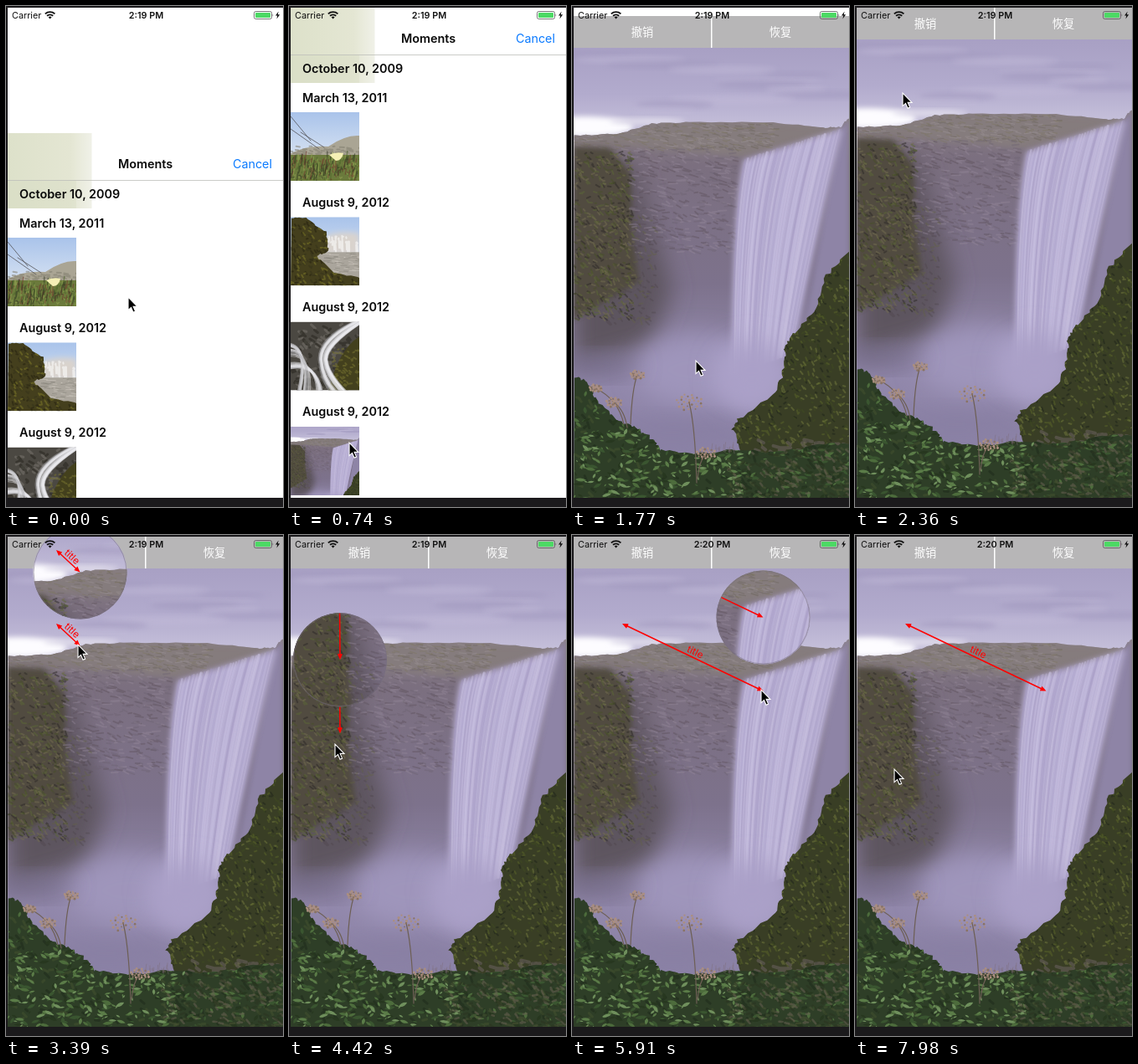
Animation of 331 by 599 pixels, one loop 8 s. Source, as an HTML page:

```html
<!DOCTYPE html>
<html lang="en">
<head>
<meta charset="utf-8">
<title>Photo annotation demo</title>
<style>
html, body { margin: 0; width: 100%; height: 100%; overflow: hidden; background: #1b1a1c; }
svg { display: block; width: 331px; height: 599px; font-family: Inter, "Liberation Sans", sans-serif; }
.head { font-size: 14.4px; font-weight: 600; fill: #0a0a0a; }
.mid { text-anchor: middle; }
.tool { font: 13.2px "Noto Sans CJK SC", "Noto Sans CJK", sans-serif; fill: #fff; text-anchor: middle; }
</style>
</head>
<body>
<svg viewBox="0 0 331 599">
  <defs>
    <clipPath id="screen"><rect x="2" y="2" width="329" height="586"/></clipPath>
    <clipPath id="frame"><rect x="2" y="40" width="329" height="548"/></clipPath>
    <clipPath id="square"><rect width="82" height="82"/></clipPath>
    <clipPath id="lens"><circle id="lensCut" r="56"/></clipPath>
    <filter id="soft" x="-30%" y="-30%" width="160%" height="160%"><feGaussianBlur stdDeviation="3"/></filter>
    <filter id="haze" x="-50%" y="-50%" width="200%" height="200%"><feGaussianBlur stdDeviation="14"/></filter>
    <linearGradient id="sky" x2="0" y2="1">
      <stop stop-color="#a8a0c4"/><stop offset=".5" stop-color="#b2abcd"/><stop offset="1" stop-color="#cbc6de"/>
    </linearGradient>
    <linearGradient id="rock" x2="0" y2="1">
      <stop stop-color="#8b8284"/><stop offset=".15" stop-color="#7b6f7f"/>
      <stop offset=".5" stop-color="#7d728c"/><stop offset=".75" stop-color="#9389ac"/><stop offset="1" stop-color="#8b82a6"/>
    </linearGradient>
    <linearGradient id="tint">
      <stop stop-color="#dde1ca"/><stop offset=".75" stop-color="#e4e6d3"/><stop offset="1" stop-color="#f0f1e8"/>
    </linearGradient>
    <linearGradient id="blue" x2="0" y2="1"><stop stop-color="#a9c3ea"/><stop offset="1" stop-color="#eef2f6"/></linearGradient>
  </defs>
  <rect width="331" height="599" fill="#1b1a1c"/>
  <g clip-path="url(#screen)">
    <rect width="331" height="599" fill="#fff"/>
    <g id="picker"></g>
    <g id="editor">
      <rect x="2" y="2" width="329" height="38" fill="#b7b6b7"/>
      <rect x="166" y="2" width="1.5" height="38" fill="#fff"/>
      <text class="tool" x="84" y="26">撤销</text>
      <text class="tool" x="249" y="26">恢复</text>
      <g id="photo" clip-path="url(#frame)"></g>
    </g>
    <g id="arrow" fill="#f00">
      <path id="shaft" stroke="#f00" stroke-width="1.5"/>
      <path id="tips"/>
      <text id="label" class="mid" font-size="11.6">title</text>
    </g>
    <g id="loupe">
      <g clip-path="url(#lens)"><use href="#photo" y="-88"/><use href="#arrow" y="-88"/></g>
      <circle id="ring" r="55.5" fill="none" stroke="#77707f" stroke-opacity=".55"/>
    </g>
    <g id="status" fill="#111">
      <text x="7" y="15" font-size="10.8">Carrier</text>
      <path d="M46.8 9.4A8.6 8.6 0 0 1 58.4 9.4M49 11.8A5.4 5.4 0 0 1 56.2 11.8" fill="none" stroke="#111" stroke-width="1.9"/>
      <path d="M50.6 13.3A3 3 0 0 1 54.6 13.3L52.6 15.6Z"/>
      <text id="clock" class="mid" x="167.5" y="15" font-size="10.8" font-weight="600"></text>
      <rect x="296.5" y="6.5" width="21" height="9" rx="2" fill="none" stroke="#555" stroke-width=".8"/>
      <rect x="298" y="8" width="18" height="6" rx="1" fill="#4cd964"/>
      <path d="M318.6 9.4q1.6 1.6 0 3.2Z" fill="#555"/>
      <path d="M325.6 6.6L322 11.6H324.3L323.4 15.4L327.2 10.2H324.8Z"/>
    </g>
  </g>
  <path id="cursor" d="M0 0V15.6L3.5 12.4L6 18.2L8.6 17.1L6.1 11.4H11Z" fill="#000" stroke="#fff" stroke-width="1.1"/>
</svg>
<script>
const $ = id => document.getElementById(id);
let seed = 7;
const rnd = () => (seed = (seed * 16807) % 2147483647) / 2147483647;
const spread = (a, size) => +(a + rnd() * size).toFixed(1);
const many = (n, make) => Array.from({ length: n }, (_, i) => make(i, i / n)).join('');
const mix = (a, b, k) => a + (b - a) * k;
const shape = (d, fill, filter) => `<path d="${d}" fill="${fill}" ${filter ? `filter="url(#${filter})"` : ''}/>`;
const line = (d, color, width, opacity = 1) =>
  `<path d="${d}" fill="none" stroke="${color}" stroke-width="${width}" stroke-linecap="round" opacity="${opacity}"/>`;
const oval = (x, y, rx, ry, fill, filter = 'haze') =>
  `<ellipse cx="${x}" cy="${y}" rx="${rx}" ry="${ry}" fill="${fill}" filter="url(#${filter})"/>`;
const box = (fill, x = 0, y = 0, w = 82, h = 82, opacity = 1) =>
  `<rect x="${x}" y="${y}" width="${w}" height="${h}" fill="${fill}" opacity="${opacity}"/>`;
const clipped = (id, d, inner) =>
  `<clipPath id="${id}"><path d="${d}"/></clipPath><g clip-path="url(#${id})">${inner}</g>`;

// Outline through a few points "x,y x,y", broken up by random offsets
function ridge(points, rough) {
  const p = points.split(' ').map(s => s.split(',').map(Number));
  return 'M' + p.slice(1).map(([x, y], i) => many(8, (_, k) =>
    `${spread(mix(p[i][0], x, k), rough)} ${spread(mix(p[i][1], y, k), rough)} `)).join('') + p.at(-1);
}

// Random short strokes inside a box, one layer for each colour
const texture = (colors, n, [x, y, w, h], dx, dy, width = 2, opacity = .55) =>
  colors.split(' ').map(color => line(many(n, () =>
    `M${spread(x, w)} ${spread(y, h)}l${spread(dx * .4, dx)} ${spread(-dy * .4, dy * 1.6)}`), color, width, opacity)).join('');

const leaves = (colors, n, [x, y, w, h], size) => colors.split(' ').map(color => shape(many(n, () => {
  const a = rnd() * 6.3, s = spread(size / 2, size), c = Math.cos(a) * s, v = Math.sin(a) * s * .6;
  const f = q => q.toFixed(1);
  return `M${spread(x, w)} ${spread(y, h)}q${f((c - v) / 2)} ${f(v / 2 + c * .3)} ${f(c)} ${f(v)}q${f((v - c) / 2)} ${f(-v / 2 - c * .3)} ${f(-c)} ${f(-v)}`;
}), color)).join('');

function umbel(x, y, r, footX, footY) {
  return line(`M${x} ${y}Q${mix(x, footX, .8)} ${mix(y, footY, .3)} ${footX} ${footY}`, '#6d5f55', 1.2) +
    many(30, i => {
      const a = i * 2.4, k = Math.sqrt(i / 30) * r;
      return `<circle cx="${x + Math.cos(a) * k}" cy="${y + Math.sin(a) * k * .6}" r="${spread(.9, .7)}" fill="${i % 3 ? '#ab8f80' : '#897363'}"/>`;
    });
}

// One thread of water; u runs from the left edge to the right
function thread(u) {
  const [x, y, fx, fy] = [205 + 118 * u, 174 - 37 * u, 191 + 72 * u, 430 - 25 * u];
  const bend = `${fx + (x - fx) * u * .55} ${y + 60 + 50 * u}`;
  return { top: `${x} ${y}`, bend, foot: `${fx} ${fy}` };
}

function waterfall() {
  const sky = box('url(#sky)', 2, 40, 329, 110) +
    many(12, i => oval(spread(0, 331), 48 + i * 6, spread(30, 50), spread(2, 4), i % 2 ? '#c3bcd9' : '#a098bd', 'soft')
      .replace('/>', ' opacity=".5"/>')) +
    oval(15, 134, 58, 12, '#fdfcff', 'soft') + oval(90, 128, 45, 4, '#dfdbea', 'soft');

  const cliff = box('url(#rock)', 2, 120, 329, 405) +
    shape('M2 145L100 130L331 134L205 170L70 158L2 160Z', '#857c7d', 'soft') +
    texture('#6b645c #9b9294 #7d775f', 110, [2, 130, 240, 32], 6, 2, 1.2, .45) +
    shape('M2 165L75 180L120 330L95 395L2 420Z', '#5d545e', 'haze') +
    shape('M2 158L45 160L70 190L72 260L80 320L2 365Z', '#514c40', 'soft') +
    texture('#5b4f59 #958798 #6d6170', 130, [66, 160, 128, 125], 7, 3, 1.8, .4) +
    texture('#2d2926 #5d6836 #495129 #756e50', 140, [2, 165, 70, 200], 3, 4, 2, .5) +
    texture('#4b4448 #62633f', 70, [40, 240, 60, 130], 3, 4, 2, .35) +
    shape('M318 140L331 124V300L270 420Z', '#8e84a6', 'soft') +
    oval(150, 425, 75, 42, '#9f95bb') + oval(215, 440, 40, 40, '#aaa0c8') +
    oval(30, 420, 50, 12, '#756c88') + oval(120, 500, 90, 16, '#887fa3');

  const left = thread(0), right = thread(1);
  const falls = shape(`M${left.top}Q${left.bend} ${left.foot}L${right.foot}Q${right.bend} ${right.top}Z`, '#b9b0d4', 'soft') +
    many(46, (_, u) => {
      const t = thread(u + rnd() * .02);
      return line(`M${t.top}Q${t.bend} ${t.foot}`, rnd() < .65 ? '#c9c1e0' : '#a297c0', spread(1, 3), spread(.2, .35));
    }) + oval(215, 425, 45, 35, '#aaa0c8');

  const hill = clipped('hillCut', ridge('331,277 302,310 290,348 264,378 252,396 252,420 242,450 196,482 190,494 200,520 331,540 331,277', 4),
    box('#393e25', 185, 270, 146, 280) + texture('#20251a #3f4a22 #586329 #6d763b', 230, [190, 275, 141, 240], 2, 4, 2, .55) +
    texture('#6b6260', 35, [200, 508, 131, 22], 8, 3, 4));

  const bank = clipped('bankCut', ridge('2,432 18,438 28,460 48,480 74,492 94,506 104,520 150,524 200,518 240,522 300,512 331,512 331,588 2,588', 4),
    box('#2e3e27', 2, 425, 329, 165) + texture('#1e2b1a #43502f', 170, [2, 430, 329, 158], 4, 6, 3) +
    leaves('#3a5530 #4d6c3c #27371f', 170, [2, 445, 329, 143], 10) +
    leaves('#5b7c48 #6f8f5c', 90, [2, 495, 210, 93], 9) +
    texture('#4a5233 #665f50 #2a3320', 90, [185, 514, 146, 74], 4, 4, 2.5));

  const flowers = umbel(78, 431, 9, 70, 490) + umbel(28, 447, 8, 62, 490) + umbel(50, 464, 10, 66, 494) +
    umbel(140, 464, 17, 149, 560) + umbel(160, 525, 12, 150, 555) + texture('#7c6d77', 20, [165, 518, 30, 6], 1, -9, .8);
  return sky + clipped('cliffCut', ridge('2,144 55,142 95,130 140,128 240,128 300,135 320,134 331,122 331,525 2,525', 1.5), cliff) +
    falls + hill + bank + flowers;
}

const meadow = () => box('url(#blue)') + shape('M0 49Q20 39 45 41Q65 27 82 28V82H0Z', '#aaa594') +
  texture('#817f70', 70, [0, 40, 82, 15], 4, 1) + box('#6b7a3c', 0, 51, 82, 31) +
  texture('#4a6428 #9aa956 #71382e #2d3220', 75, [0, 56, 82, 26], 1, -9, 1.3) +
  line('M0 5L24 34M0 20L34 44M12 24L40 42', '#55555a', .8) + shape('M46 51Q54 47 63 49Q61 58 54 58Z', '#f5f0b5');

const river = () => box('url(#blue)') + shape('M42 23Q60 16 82 20V45H40Z', '#d9d3cd', 'soft') +
  texture('#fff', 34, [43, 22, 37, 13], .5, 12) + box('#aaa59c', 30, 42, 52, 35) +
  texture('#d0cbc1 #88847b', 30, [36, 43, 46, 25], 8, 1, 1) +
  clipped('shoreCut', ridge('0,0 17,0 42,17 44,40 30,46 51,66 82,72 82,82 0,82', 2),
    box('#443f1d') + texture('#25210f #7d7828 #36331a', 100, [0, 5, 82, 77], 2, 3));

const cascade = () => box('#4b4842') + texture('#77736c #292720', 60, [0, 0, 82, 82], 4, 5, 3) +
  shape('M82 18Q58 32 45 82H82Z', '#43401d') + texture('#777331', 70, [50, 32, 32, 45], 2, 2) +
  many(36, i => {
    const x = spread(0, 10), near = i % 2;
    const d = near ? `M-3 ${26 + x * 3}Q${22 + x} ${28 + x * 2} ${8 + x * 3} 86` : `M${76 + x} 0Q${32 + x} ${20 + x} ${34 + x} 46T${50 + x * 2} 86`;
    return line(d, rnd() < .75 ? '#eeeef2' : '#a9a9ae', spread(1, 3), .5);
  });

function pickerList() {
  const thumbs = [meadow(), river(), cascade(), '<use href="#photo" transform="scale(.25) translate(-2 -72)"/>'];
  const rows = thumbs.map((art, i) => {
    const y = 127 + i * 125.3;
    return `<text class="head" x="16" y="${y - 12.5}">${i ? 'August 9, 2012' : 'March 13, 2011'}</text>` +
      `<g transform="translate(2 ${y})" clip-path="url(#square)">${art}</g>`;
  }).join('');
  return box('#fff', 2, 2, 329, 588) + box('url(#tint)', 2, 2, 100.5, 90) +
    box('#d5d9c1', 2, 58, 82, 34, .35) + box('#bfc0bb', 2, 58, 329, .8) +
    '<text class="head mid" x="166.5" y="44">Moments</text>' +
    '<text x="271" y="44" font-size="14.3" fill="#0a7aff">Cancel</text>' +
    '<text class="head" x="16" y="80">October 10, 2009</text>' + rows;
}

$('photo').innerHTML = waterfall();
$('picker').innerHTML = pickerList();

// Pointer moves: start, end, x, y
const moves = [
  [150, 590, 72, 522], [1180, 1620, 148, 424], [1920, 2360, 57, 104],
  [2660, 3270, 86, 131], [3400, 4420, 55, 249], [4420, 5170, 75, 402], [5170, 5780, 226, 185],
  [6355, 7080, 75, 417], [7245, 7960, 47, 280]
];
const pointer = t => moves.reduce(([x, y], [from, to, nx, ny]) => {
  const k = Math.min(1, Math.max(0, (t - from) / (to - from)));
  return [mix(x, nx, k), mix(y, ny, k)];
}, [146, 348]);

// Critically damped modal slide, 1 to 0
const spring = ms => ms <= 0 ? 1 : (1 + .01826 * ms) * Math.exp(-.01826 * ms);
const show = (id, on) => $(id).style.display = on ? '' : 'none';
const move = (id, x, y) => $(id).setAttribute('transform', `translate(${Math.round(x)} ${Math.round(y)})`);

function drawArrow(x, y) {
  const x0 = 60, y0 = 106, a = Math.atan2(y - y0, x - x0), c = Math.cos(a), s = Math.sin(a);
  const tip = (px, py, k) =>
    `M${px} ${py}L${px - k * 7 * c - 3 * s} ${py - k * 7 * s + 3 * c}L${px - k * 7 * c + 3 * s} ${py - k * 7 * s - 3 * c}Z`;
  $('shaft').setAttribute('d', `M${x0 + 3 * c} ${y0 + 3 * s}L${x - 3 * c} ${y - 3 * s}`);
  $('tips').setAttribute('d', tip(x0, y0, -1) + tip(x, y, 1));
  $('label').setAttribute('transform', `translate(${(x0 + x) / 2} ${(y0 + y) / 2}) rotate(${a * 180 / Math.PI}) translate(0 -3)`);
}

function render(t) {
  move('picker', 0, 587 * (t < 930 ? spring(t + 146) : 1 - spring(t - 930)));
  show('picker', t < 1450);
  move('editor', 0, 587 * spring(t - 1441));
  show('editor', t > 1441);
  move('cursor', ...pointer(t));

  // The drag end trails the pointer and stays put on release
  const [px, py] = pointer(Math.min(t, 6400) - 120), x = px + 2.5, y = py + 1.5;
  drawArrow(x, y);
  show('arrow', t > 2900);
  show('loupe', t > 2900 && t < 6450);
  for (const id of ['lensCut', 'ring']) {
    $(id).setAttribute('cx', x);
    $(id).setAttribute('cy', y - 88);
  }
  $('clock').textContent = t < 5300 ? '2:19 PM' : '2:20 PM';
}

const STEP = 147.5, LOOP = 8000;
let last = -1;
function tick(now) {
  const n = Math.floor((now % LOOP + 6) / STEP);
  if (n !== last) render((last = n) * STEP);
  requestAnimationFrame(tick);
}
render(0);
requestAnimationFrame(tick);
</script>
</body>
</html>
```
